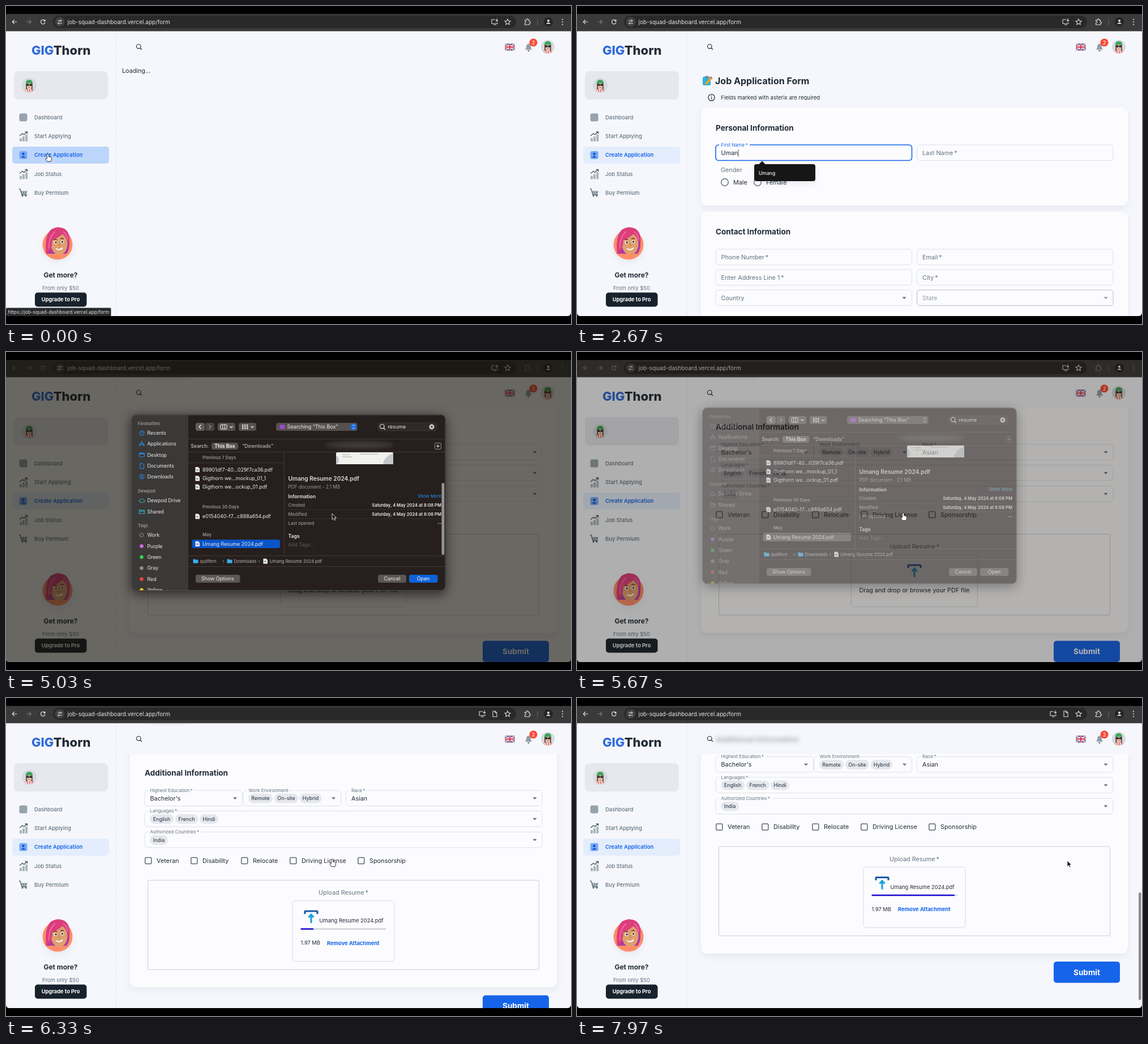
An HTML page that plays this animation: 998 px wide and 561 px high, repeating every 8 s.

```html
<!DOCTYPE html>
<html lang="en">
<head>
<meta charset="utf-8">
<title>Job application form</title>
<style>
html, body { margin: 0; width: 100%; height: 100%; overflow: hidden; background: #000; }
svg { display: block; width: 998px; height: 561px; }
text { font-family: Inter, "Open Sans", sans-serif; white-space: pre; }
</style>
</head>
<body>
<svg id="stage" viewBox="0 0 998 561" xmlns="http://www.w3.org/2000/svg">
  <defs>
    <clipPath id="window"><path d="M0 14H998V541a6 6 0 0 1-6 6H6a6 6 0 0 1-6-6Z"/></clipPath>
    <clipPath id="main"><path d="M195 44H998V547H195Z"/></clipPath>
    <clipPath id="panel"><rect x="221.5" y="110.500" width="555" height="310.500" rx="8"/></clipPath>
    <clipPath id="face"><circle r="11.500"/></clipPath>
    <filter id="blur" x="-20%" y="-100%" width="140%" height="300%"><feGaussianBlur stdDeviation="3.5"/></filter>
    <filter id="glow" x="-20%" y="-20%" width="140%" height="140%"><feGaussianBlur stdDeviation="10"/></filter>
    <filter id="shadow" x="-20%" y="-20%" width="140%" height="160%"><feDropShadow dx="0" dy="5" stdDeviation="6" flood-color="#8c9bb5" flood-opacity=".16"/></filter>
  </defs>
  <g clip-path="url(#window)">
    <rect width="998" height="561" fill="#f6f7fc"/>
    <g id="page" clip-path="url(#main)"></g>
    <g id="frame"></g>
    <g id="menu"></g>
    <g id="toolbar"></g>
    <g id="overlay"></g>
    <g id="dialog"></g>
    <g id="pointer"></g>
  </g>
</svg>
<script>
const LOOP = 8000, CUT = 4500;
const INK = '#212b36', MUTED = '#637381', PALE = '#919eab', BLUE = '#1664e9', LINE = '#dde1e8';
const FIRST = 'Umang', LAST = 'Velari', FILE = 'Umang Resume 2024.pdf';

const seg = (t, a, b) => Math.min(1, Math.max(0, (t - a) / (b - a)));
const ease = p => p * p * (3 - 2 * p);
const mix = (a, b, p) => a + (b - a) * p;

// Text is placed by its vertical centre.
const text = (x, y, s, size, fill = INK, weight = 400, anchor = 'start') =>
  `<text x="${x}" y="${y + size * .36}" font-size="${size}" fill="${fill}" font-weight="${weight}" text-anchor="${anchor}">${s}</text>`;
const box = (x, y, w, h, r, fill, extra = '') =>
  `<rect x="${x}" y="${y}" width="${w}" height="${h}" rx="${r}" fill="${fill}" ${extra}/>`;
const dot = (x, y, r, fill, extra = '') => `<circle cx="${x}" cy="${y}" r="${r}" fill="${fill}" ${extra}/>`;
const line = (d, stroke, width = 1, extra = '') =>
  `<path d="${d}" fill="none" stroke="${stroke}" stroke-width="${width}" ${extra}/>`;
const shape = (d, fill, extra = '') => `<path d="${d}" fill="${fill}" ${extra}/>`;
const at = (x, y, body, extra = '') => `<g transform="translate(${x} ${y})" ${extra}>${body}</g>`;
const outline = (color, width = 1) => `stroke="${color}" stroke-width="${width}"`;
const card = (y, h) => box(219, y, 754, h, 11, '#fcfcfe', 'filter="url(#shadow)"');
const caretDown = (x, y, fill = MUTED) => shape(`M${x - 3.6} ${y - 1.8}h7.2l-3.6 3.7z`, fill);

// ---------- illustrations ----------
const avatar = (x, y, r) => at(x, y, dot(0, 0, r, '#d5dade') + `<g clip-path="url(#face)">` +
  shape('M-8 12Q-8 5 0 5T8 12Z', '#e9817b') + line('M-5 6V12M-1 6V12M3 6V12', '#f3efef', 1.6) +
  shape('M-6 7V-4H6V7H3.500V-2H-3.500V7Z', '#6b5a55') +
  box(-3.8, -4, 7.6, 10.5, 3.5, '#efc4ad') + shape('M-6-3.500Q-6-10 0-10T6-3.500Z', '#43ad62') +
  line('M-5-7H5', '#2f7f49', .8) +
  box(-4.5, -2.6, 4.2, 3.6, 1.3, '#2a2a2a') + box(.3, -2.6, 4.2, 3.6, 1.3, '#2a2a2a') +
  line('M-1.500 3.500H1.500', '#b5574f') + '</g>');

const heroine = at(91, 420,
  dot(0, 1, 26.5, '#ff8d68', 'filter="url(#shadow)"') +
  shape('M-20 17Q-23-14-12-25Q0-33 12-27Q23-20 21-2Q22 8 16 17H-12Z', '#b23a9c') +
  `<ellipse cx="3" cy="0" rx="14.500" ry="19" fill="#df9f6e"/>` +
  shape('M-20 18Q-23-14-12-25Q0-33 12-27Q23-20 21 0Q17-9 9-18Q0-10-9-7Q-9 10-20 18Z', '#dc3d7c') +
  line('M-15 8Q-16-12-4-22M10-22Q17-17 18-8', '#ef6a9f', 2) +
  dot(-3.5, -3, 2.8, '#fff') + dot(8.5, -4, 2.8, '#fff') + dot(-3, -3, 1.7, '#33251f') + dot(8.5, -4, 1.7, '#33251f') +
  line('M-7-7.500q3-2 6 0M5-9q3-2 6 0', '#6b2d36', 1.3) + line('M3-2V3H5', '#bd7c52', 1.2) + line('M-3 8Q4 12 9 6.500', '#fff', 2));

const chart = (x, y) => at(x, y,
  box(-7, 3, 4, 6, 1.2, '#a9b4bd') + box(-2, 0, 4, 9, 1.2, '#a9b4bd') + box(3.2, -3, 4, 12, 1.2, '#a9b4bd') +
  line('M-7-1L-2-5L1-3L6-8M2.5-8H6.5V-4.5', '#51616f', 1.5));
const cart = at(31, 329, shape('M-5-3H7L5 4H-3Z', '#a9b4bd') +
  line('M-8-6H-6L-3 4H6', '#51616f', 1.3) + dot(-2, 6, 1.4, '#51616f') + dot(4, 6, 1.4, '#51616f') +
  dot(0, 0, 1, '#51616f') + dot(4, 0, 1, '#51616f'));
const flag = at(881.5, 66.5, box(0, 0, 17, 12, 1, '#213a88') +
  line('M0 0L17 12M17 0L0 12', '#fff', 2.4) + line('M0 0L17 12M17 0L0 12', '#d22f45', .8) +
  line('M8.5 0V12M0 6H17', '#fff', 4) + line('M8.5 0V12M0 6H17', '#d22f45', 2.2));
const bell = at(923, 73, shape('M-6 4Q-4 2-4-1Q-4-6 0-6.5T4-1Q4 2 6 4Z', '#929da8') + shape('M-2 5H2Q1 7.5 0 7.5T-2 5Z', MUTED));
const uploadIcon = (x, y) => at(x, y,
  line('M-11-5V-9Q-11-10-10-10H10Q11-10 11-9V-5', '#1d57a5', 3.2) + line('M0 11V-3M-4.6 1L0-4L4.6 1', '#1ba4e0', 3.2));
const clipboard = at(230, 132, box(-8, -7, 14, 15, 2, '#27b5dc') + box(-4, -8.5, 6, 3, 1, '#77848f') +
  shape('M-3 4L5-6L8-3L0 6L-4 7Z', '#f5a623') + shape('M5-6L7-8L9.5-5L8-3Z', '#e85d6b'));

// ---------- fixed parts ----------
const search = (x, y, color) => dot(x - .7, y - .7, 3.8, 'none', outline(color, 1.2)) + line(`M${x + 2} ${y + 2}l3 3`, color, 1.3);

const frame = box(0, 44, 194, 503, 0, '#f6f7fc') +
  line('M194 44V547', '#d9dee6', 1, 'stroke-dasharray="2 2"') +
  `<text x="45" y="86" font-size="22" font-weight="800" fill="${INK}"><tspan fill="#2f6adb">GIG</tspan>Thorn</text>` +
  box(14, 115, 166, 50, 8, '#e6e8ee') + avatar(41, 140, 13) +
  heroine + text(96.5, 475, 'Get more?', 12, INK, 700, 'middle') +
  text(96.5, 497.5, 'From only $50', 9.5, MUTED, 400, 'middle') +
  box(51, 505.5, 91.5, 25, 5, '#18222c') + text(96.5, 518, 'Upgrade to Pro', 9.3, '#fff', 700, 'middle') +
  search(235, 72, INK) + flag + bell + dot(931.5, 64.5, 7, '#fb4935') +
  text(931.5, 64.5, '2', 8.5, '#fff', 500, 'middle') + avatar(957, 72, 12);

function menu(t) {
  const hover = 1 - seg(t, 600, 800);
  const items = [['Dashboard', 196.5], ['Start Applying', 230], ['Create Application', 263], ['Job Status', 296.5], ['Buy Permium', 329.5]];
  return box(11, 248, 171, 30, 5, '#e3edfc') + box(11, 248, 171, 30, 5, '#bcd5fb', `opacity="${hover}"`) +
    items.map(([s, y], i) => text(50, y, s, 9.5, i == 2 ? BLUE : MUTED, i == 2 ? 600 : 500)).join('') +
    box(23.5, 189.5, 14, 14, 3, '#96a3ad') + chart(31, 230) + chart(31, 296.5) + cart +
    box(23.5, 256, 14, 14, 3, '#78aaf7') + dot(30.5, 261, 2.3, '#1455c8') + shape('M26.5 267.5q4-6 8 0z', '#1455c8');
}

function toolbar(t) {
  const modal = t >= CUT && t < 5940, nav = modal ? '#777' : '#e4e4e4';
  const downloaded = t >= 5940, ix = downloaded ? 841 : 863;
  const page = downloaded ? line('M860 23h4l3 3v7h-7zM864 23v3h3', '#ddd', 1.1) : '';
  return box(0, 14, 998, 30.5, 0, '#3a3a3a') + box(83, 17, 818, 22, 11, '#292929') +
    line('M19.5 28H11.5M15 24.2L11.2 28L15 31.8', nav, 1.2) + line('M36 28H44M40.5 24.2L44.3 28L40.5 31.8', '#7b7b7b', 1.2) +
    line('M68.5 26A3.8 3.8 0 1 0 69 29M69 24V26.7H66.2', nav, 1.2) +
    dot(95, 28, 8.5, '#414141') + line('M91 26H94M96.5 26H99M91 30.5H93M95.5 30.5H99', '#ddd', 1.2) +
    dot(96, 26, 1.4, 'none', outline('#ddd')) + dot(93.5, 30.5, 1.4, 'none', outline('#ddd')) +
    text(108.5, 28, 'job-squad-dashboard.vercel.app/form', 10, '#e6e6e6') +
    line(`M${ix + 1} 24h-6v7h10v-2M${ix - 2} 33h5M${ix + 4} 22v5m-2-2l2 2l2-2`, '#ddd', 1.1) + page +
    line('M886 23l1.5 3.3l3.5.4l-2.600 2.400l.7 3.500l-3.100-1.800l-3.100 1.800l.7-3.500l-2.600-2.400l3.500-.4z', '#ddd', 1.1) +
    line('M916.500 25h3q0-2.500 1.500-2.500t1.500 2.500h2v3q2 0 2 1.500t-2 1.500v2h-8v-3q2-.300 2-1.800t-2-1.700z', nav, 1.1) +
    line('M939 23V34', '#666') + dot(958, 28, 8, '#242424') + dot(958, 26, 2, '#eee') + shape('M953.800 31.500q4.200-5 8.400 0z', '#eee') +
    [23.5, 28, 32.5].map(y => dot(983, y, 1.1, nav)).join('');
}

// ---------- first screen ----------
const label = s => s.replace(' *', '\u2009*');

function field(x, y, w, name, { value = '', focus = false, float = 0, hover = false, caret = false, border = LINE } = {}) {
  const color = focus ? BLUE : hover ? INK : border;
  const size = mix(10.8, 8.1, float), labelY = mix(y + 13.7, y, float);
  const bar = caret ? `<tspan fill="#333" dx="-1.2">|</tspan>` : '';
  return box(x, y, w, 27.5, 5, 'none', outline(color, focus ? 1.6 : 1)) +
    (float ? box(x + 6, y - 3, name.length * 4.1 * float + 5, 6, 0, '#fcfcfe') : '') +
    text(x + 9.5, labelY, label(name), size, focus ? BLUE : border == LINE ? MUTED : PALE) +
    text(x + 9.5, y + 13.7, value + bar, 10.8);
}

const suggestion = (x, s) =>
  box(x, 279, 108, 30, 4, '#171717', 'filter="url(#shadow)"') + shape(`M${x + 8} 279.500l6-6l6 6z`, '#171717') +
  text(x + 8, 294.5, s, 8.6, '#f2f2f2', 500);

const radio = (x, s) => dot(x, 311, 6.3, 'none', outline('#5f6b78', 1.4)) + text(x + 15, 311, s, 10.8);

function personal(t) {
  const firstFocus = t >= 1250 && t < 3150, lastFocus = t >= 3150;
  const typed = (s, start, step) => s.slice(0, Math.max(0, Math.floor((t - start) / step) + 1));
  const first = typed(FIRST, 2000, 180), last = typed(LAST, 3450, 250);
  const blink = since => (t - since) % 1000 < 500;
  const caret1 = firstFocus && (t > 2000 && t < 2800 || blink(1250));
  const caret2 = lastFocus && (t > 3450 || blink(3150));
  return clipboard + text(244, 132, 'Job Application Form', 16, INK, 700) +
    dot(237.5, 161.5, 5.7, 'none', outline(INK, 1.2)) + line('M237.500 160.500V164.500M237.500 158V159.300', INK, 1.2) +
    text(254, 162, 'Fields marked with asterix are required', 9.55) +
    card(179, 173) + text(245, 215, 'Personal Information', 13.5, INK, 700) +
    field(245, 245, 346.5, 'First Name *', { value: first, focus: firstFocus, float: ease(seg(t, 1250, 1430)), hover: t > 1050, caret: caret1 }) +
    field(600.5, 245, 346.5, 'Last Name *', { value: last, focus: lastFocus, float: ease(seg(t, 3150, 3330)), caret: caret2 }) +
    text(254, 289, 'Gender', 10.8, MUTED) + radio(261, 'Male') + radio(319, 'Female') +
    card(363, 220) + text(245, 398.5, 'Contact Information', 13.5, INK, 700) +
    field(245, 429, 346.5, 'Phone Number *') + field(600.5, 429, 346.5, 'Email *') +
    field(245, 465, 346.5, 'Enter Address Line 1 *') + field(600.5, 465, 346.5, 'City *') +
    field(245, 501, 346.5, 'Country') + field(600.5, 501, 346.5, 'State', { border: '#b5bbc3' }) +
    caretDown(578, 515) + caretDown(934, 515, PALE) +
    (t >= 1300 && t < 2720 ? suggestion(313, FIRST) : '') + (t >= 3450 ? suggestion(669, LAST) : '');
}

// ---------- second screen ----------
const select = (x, y, w, name, value = '') =>
  field(x, y, w, name, { value, float: 1 }) + caretDown(x + w - 13, y + 14);
const chip = (x, y, w, s) => box(x, y - 8.5, w, 17, 8.5, '#e5e8ed') + text(x + w / 2, y, s, 9, INK, 400, 'middle');
const check = (x, s) => box(x + .8, 281.5, 11, 11, 1.5, 'none', outline('#5c6875', 1.5)) + text(x + 21, 287, s, 10.8);

function additional(t) {
  const uploaded = t >= 5940, grow = uploaded ? 15 : 0;
  const scroll = 59.5 * ease(seg(t, 7540, 7860));
  const dashed = 'stroke-dasharray="2 1.500" ' + outline('#b9bfc8');
  const drop = uploaded
    ? box(506, 357.5, 180, 107, 5, 'none', dashed) + uploadIcon(539, 386) +
      text(553.5, 393, FILE, 9.4) + box(520.5, 406.3, 151, 2.4, 1, '#d0d3dc') +
      box(520.5, 406.3, 151 * seg(t, 6030, 8030), 2.4, 1, '#1b0bd2') +
      text(520.5, 432, '1.97 MB', 9.3) + text(567, 432.5, 'Remove Attachment', 9.35, BLUE, 700)
    : box(484.5, 357.5, 223, 92, 5, 'none', dashed) + uploadIcon(596, 386) +
      text(596, 420, 'Drag and drop or browse your PDF file', 10.75, INK, 400, 'middle');
  const content = card(60, 435.5 + grow) + text(245, 132.5, 'Additional Information', 13.5, INK, 700) +
    select(245, 163, 172.5, 'Highest Education *', "Bachelor's") +
    select(419, 163, 172.5, 'Work Environment') + chip(428, 177, 43, 'Remote') + chip(474, 177, 42, 'On-site') + chip(518.5, 177, 39, 'Hybrid') +
    select(600.5, 163, 346.5, 'Race *', 'Asian') +
    select(245, 199.5, 702, 'Languages *') + chip(254, 213.5, 42, 'English') + chip(299, 213.5, 40.5, 'French') + chip(342, 213.5, 33, 'Hindi') +
    select(245, 236.5, 702, 'Authorized Countries *') + chip(254, 250.5, 32, 'India') +
    check(245, 'Veteran') + check(326, 'Disability') + check(415, 'Relocate') + check(501, 'Driving License') + check(621, 'Sponsorship') +
    box(250.5, 321.5, 691, 142.5 + grow, 2, 'none', outline('#c9ced6')) +
    text(596, 343.5, 'Upload Resume\u2009*', 10.8, MUTED, 400, 'middle') + drop +
    box(842, 509.5 + grow, 117, 37.5, 5, BLUE) + text(900.5, 528.5 + grow, 'Submit', 13.6, '#fff', 700, 'middle');
  // Content passing beneath the frosted header is blurred.
  const frosted = box(195, 44, 803, 55, 0, '#f6f7fc') +
    `<g filter="url(#blur)" opacity=".35">${scroll ? text(245, 132.5 - scroll, 'Additional Information', 13.5, INK, 700) : box(257, 43, 60, 3, 1, '#9aa3b0')}</g>`;
  const bar = t > 7540 ? box(992, mix(325, 343, scroll / 59.5), 4.5, 190, 2.2, '#8d8d90') : '';
  return at(0, -scroll, content) + frosted + bar;
}

// ---------- file picker ----------
function picker(active) {
  const white = '#ececec', grey = '#9a9693', rule = '#403835';
  const sky = active ? '#2490f5' : '#5f9ccc', teal = active ? '#31b8d8' : '#6fa3ad';
  const heading = (y, s) => text(233, y, s, 7.7, '#9b9998', 600);
  const icons = [
    dot(0, 0, 4, 'none', outline(sky)) + line('M0-2.500V0H2', sky),
    line('M-4 4L0-4L4 4M-5 1H5', sky, 1.2),
    box(-4.5, -3.5, 9, 7, 1, 'none', outline(sky)) + line('M-4-2H4', sky, 1.5),
    line('M-3-4.500H1L3.500-2V4.500H-3Z', sky),
    dot(0, 0, 4, 'none', outline(sky)) + line('M0-2.500V2M-1.700 .500L0 2.200L1.700 .500', sky),
    line('M-3 3Q-5.500 2.500-5 0Q-4-2-2-1.500Q0-5 3-1Q5.500-1 5 2Q4 3 3 3Z', teal),
    line('M-4.500-3H-1L0-2H4.500V3.500H-4.500ZM-4.500-.500H4.500', teal, 1.1)];
  const places = [['Recents', 143], ['Applications', 162], ['Desktop', 181.5], ['Documents', 201], ['Downloads', 220], ['Dewpod Drive', 262], ['Shared', 281.5]];
  const tags = [['Work', 'none'], ['Purple', '#d96bf0'], ['Green', '#32d74b'], ['Gray', '#8e8e93'], ['Red', '#ff453a'], ['Yellow', '#ffd60a']];
  const sidebar = box(221, 110, 101, 311, 0, active ? '#3b3938' : '#342e2c') +
    `<g opacity="${active ? 1 : .55}">` + heading(126.5, 'Favourites') + heading(245.5, 'Dewpod') + heading(306.5, 'Tags') +
    places.map(([s, y], i) => at(240, y, icons[i]) + text(249.5, y, s, 8.8, white)).join('') +
    tags.map(([s, c], i) => dot(239.5, 323 + i * 19.4, 3.2, c, c == 'none' ? outline(grey) : '') + text(249.5, 323 + i * 19.4, s, 8.8, white)).join('') + '</g>';

  const sheet = (x, y) => shape(`M${x - 3.5} ${y - 4.5}h5l2.500 2.500v6.500h-7.500z`, '#f3f3f3') + box(x - 2, y - 1, 4, 3, 0, '#8fa6b8');
  const folder = (x, y) => shape(`M${x - 4.5} ${y - 3.5}h3.500l1 1h4.500v6h-9z`, '#3caef0');
  const row = (y, s) => sheet(338, y) + text(347, y, s, 8.9, white);
  const group = (y, s) => text(347, y, s, 7.7, grey, 600);
  const button = (x, y, w, h, fill) => box(x, y, w, h, 3.5, fill);
  const chevron = (x, y) => line(`M${x - 2.5} ${y - 1}l2.500 2.500l2.500-2.500`, white, 1.2);

  const controls = button(335, 125, 16, 14, '#615c5a') + button(352, 125, 16, 14, '#494442') +
    line('M344.500 128.500L341 132L344.500 135.500', white, 1.3) + line('M358.500 128.500L362 132L358.500 135.500', grey, 1.3) +
    button(374, 125, 31, 14, '#56514e') + box(379, 128, 11, 8, 1, 'none', outline(white)) + line('M382.700 128V136M386.300 128V136', white) + chevron(398, 132) +
    button(411, 125, 31, 14, '#56514e') + line('M417 129H428M417 132H428M417 135H428', white, 2, 'stroke-dasharray="2.500 1.500"') + chevron(435, 132) +
    button(477, 125, 143.5, 14, '#56514e') + box(483.5, 128.5, 9, 7, 1.5, '#a24bd0') + text(496.5, 132, 'Searching “This Box”', 9, white) +
    box(609, 126.5, 10, 11, 2.5, active ? '#1769dc' : '#56514e') + line('M611.700 130.500L614 128.300L616.300 130.500M611.700 133.500L614 135.700L616.300 133.500', white) +
    box(657, 125, 104, 14, 3.5, '#302927', outline('#3c3532')) + search(665, 132, white) + text(674.5, 132, 'resume', 9, white) +
    dot(752, 132, 4.5, '#d0cecd') + line('M750.300 130.300l3.400 3.400m0-3.400l-3.400 3.400', '#342e2b', 1.1) +
    `<ellipse cx="625" cy="164" rx="60" ry="6" fill="#777170" opacity=".35" filter="url(#blur)"/>` +
    text(326.5, 166, 'Search:', 8.5, '#b8b4b1', 600) + button(363, 160, 47, 12, '#575250') + text(386.5, 166, 'This Box', 8.8, '#fff', 600, 'middle') +
    text(417, 166, '“Downloads”', 8.8, '#b8b4b1', 500) +
    `<g opacity="${active ? 1 : .4}">` + box(757.5, 160.5, 11, 11, 2.5, 'none', outline(grey)) + line('M760 166h6m-3-3v6', white) + '</g>';

  const files = group(186.5, 'Previous 7 Days') + row(207.5, '89901df7-40...029f7ca36.pdf') + row(223, 'Gigthorn we...mockup_01_1') +
    row(238, 'Gigthorn we...ockup_01.pdf') + group(273.5, 'Previous 30 Days') + row(290, 'e0154040-f7...c888a654.pdf') +
    group(322, 'May') + box(328.5, 331, 155.5, 15, 3, active ? '#0a54c8' : '#5b5654') + row(338.5, FILE);

  const detail = (y, name, value) => text(498.5, y, name, 7.8, grey, 500) + text(769, y, value, 7.6, white, 600, 'end');
  const preview = box(583, 177, 101, 21, 2, '#f1f1ef') + shape('M583 183a8 8 0 0 1 0 15ZM684 179q-16 5-18 19h18Z', '#c4c7cb') +
    line('M594 181h14M594 185h18M625 180h32', '#9b9b86', .8) +
    text(498.5, 223.5, FILE, 10.2, '#dedbd9', 600) + text(498.5, 238, 'PDF document - 2.1 MB', 8.3, grey) +
    text(498.5, 254.5, 'Information', 8.7, white, 600) + text(769, 254.5, 'Show More', 7.8, sky, 400, 'end') +
    detail(270, 'Created', 'Saturday, 4 May 2024 at 8:08 PM') + detail(286, 'Modified', 'Saturday, 4 May 2024 at 8:08 PM') + detail(302, 'Last opened', '--') +
    line('M498 278H769M498 294H769', rule, .7) + text(498.5, 324.5, 'Tags', 8.7, white, 600) + text(498.5, 340, 'Add Tags...', 8.6, '#625c59') +
    (active ? box(769.5, 231, 4.8, 127, 2.4, '#969390') : '');

  const footer = folder(335, 369) + text(342.5, 369, 'quillfern', 7.6, '#b8b4b1') + text(382, 369, '›', 9, grey) +
    folder(395, 369) + text(402.5, 369, 'Downloads', 7.6, '#b8b4b1') + text(445.5, 369, '›', 9, grey) +
    sheet(458, 369) + text(465.5, 369, FILE, 7.7, '#b8b4b1') +
    button(335, 393, 78.5, 14, '#5c5754') + text(374, 400, 'Show Options', 8.8, white, 400, 'middle') +
    button(657, 393, 50, 14, '#5c5754') + text(682, 400, 'Cancel', 8.8, white, 400, 'middle') +
    button(712, 393, 50.5, 14, active ? '#0f62d8' : '#5c5754') + text(737, 400, 'Open', 8.8, '#fff', 400, 'middle');

  return box(221, 114, 556, 313, 10, '#000', 'opacity=".6" filter="url(#glow)"') +
    `<g clip-path="url(#panel)">` + box(221, 110, 556, 311, 8, '#261f1d') + sidebar +
    line('M322 153.500H777M322 176.500H777M322 195.500H491M322 359.500H777M322 378.500H777M491.500 177V359', rule) +
    controls + files + preview + footer + '</g>' +
    box(222, 111, 554, 309.5, 7.5, 'none', outline('#5a5553', .8));
}

const closing = t => seg(t, 5400, 5940);
const modalOpen = t => t >= CUT && t < 5940;
const activePicker = picker(true), idlePicker = picker(false);

function dialog(t) {
  if (!modalOpen(t)) return '';
  const p = closing(t);
  return at(0, -24 * p, p ? idlePicker : activePicker, `opacity="${1 - p}"`);
}

function overlay(t) {
  if (modalOpen(t)) return box(0, 14, 998, 533, 0, '#130f06', `opacity="${.62 * (1 - closing(t))}"`);
  const fade = 1 - seg(t, 1400, 1600);
  return t < 1600 ? `<g opacity="${fade}">` + box(0, 532.5, 185.5, 15, 2, '#292a2b') +
    text(3.5, 540, 'https://job-squad-dashboard.vercel.app/form', 8.3, '#e5e5e5') + '</g>' : '';
}

// ---------- pointer ----------
const arrow = shape('M0 0V10.500L2.500 8.200L4.300 12L6 11.200L4.300 7.500H7.500Z', '#111', outline('#fff', .8));
const hand = shape('M-1.500 7V.500Q-1.500-1 0-1T1.500.500V4Q3 3 4 4.500Q6 4 6.500 6.500V9L5 12.500H-1L-4 8Q-4 6-1.500 7Z', '#fff', outline('#222', .9));
const beam = line('M-2.500-5Q0-5 0-3.500Q0-5 2.500-5M0-3.500V4M-2.500 5Q0 5 0 3.500Q0 5 2.500 5M-1.500 1.500H1.500', '#111', 1.1);

function pointer(t) {
  if (t >= 2000 && t < CUT) return '';
  if (t < CUT) {
    const p = ease(seg(t, 500, 1100)), x = mix(74, 276.5, p);
    return at(x, mix(262, 259.5, p), x < 182 ? hand : x > 246 ? beam : arrow);
  }
  const p = ease(seg(t, 6600, 7400)), x = mix(576, 866, p);
  return at(x, mix(285, 287, p), t > 5450 && x < 706 ? hand : arrow);
}

// ---------- playback ----------
const page = t => t < 450 ? text(205, 114, 'Loading...', 10.8) : t < CUT ? personal(t) : additional(t);
const layers = { page, menu, toolbar, overlay, dialog, pointer };
const drawn = {};
document.getElementById('frame').innerHTML = frame;

function render(now) {
  const t = now % LOOP;
  for (const id in layers) {
    const markup = layers[id](t);
    if (drawn[id] !== markup) document.getElementById(id).innerHTML = drawn[id] = markup;
  }
  requestAnimationFrame(() => render(performance.now() - start));
}
const start = performance.now();
render(0);
</script>
</body>
</html>
```
